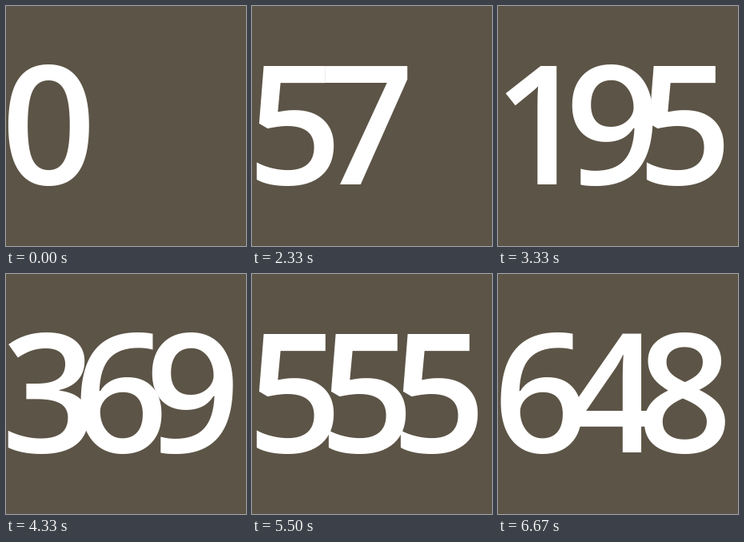
An HTML page that plays this animation: 300x300 px, repeating every 8000 ms.

```html
<!DOCTYPE html>
<html lang="en">
<head>
<meta charset="utf-8">
<title>Counter</title>
<style>
  html, body { margin: 0; width: 100%; height: 100%; overflow: hidden; background: #5c5446; }
  svg { display: block; width: 100%; height: 100%; }
  text { font: 560 208px "Open Sans", "Noto Sans", sans-serif; fill: #fff; text-anchor: middle; }
</style>
</head>
<body>
<svg viewBox="0 0 300 300"><text id="count" x="53.3 143.3 233.3" y="222.5">0</text></svg>
<script>
const LOOP = 8000, START = 1500, STEP = 500 / 3, TOTAL = 648;
// Count reached at given steps; a cosine ease runs between them.
const keys = [[0, 3], [5, 57], [11, 195], [17, 369], [21, 481], [27, 610], [31, TOTAL]];
const label = document.getElementById('count');

const phase = value => Math.acos(1 - 2 * value / TOTAL);

function countAt(time) {
  // The small lead absorbs rounding of step times to 10 ms.
  const step = Math.floor((time - START + 4) / STEP);
  if (step < 0) return 0;
  const next = keys.findIndex(([k]) => k > step);
  if (next < 0) return TOTAL;
  const [k0, v0] = keys[next - 1], [k1, v1] = keys[next];
  const a = phase(v0), b = phase(v1);
  const angle = a + (b - a) * (step - k0) / (k1 - k0);
  return Math.round(TOTAL * (1 - Math.cos(angle)) / 2);
}

function draw() {
  label.textContent = countAt(performance.now() % LOOP);
  requestAnimationFrame(draw);
}
draw();
</script>
</body>
</html>
```
